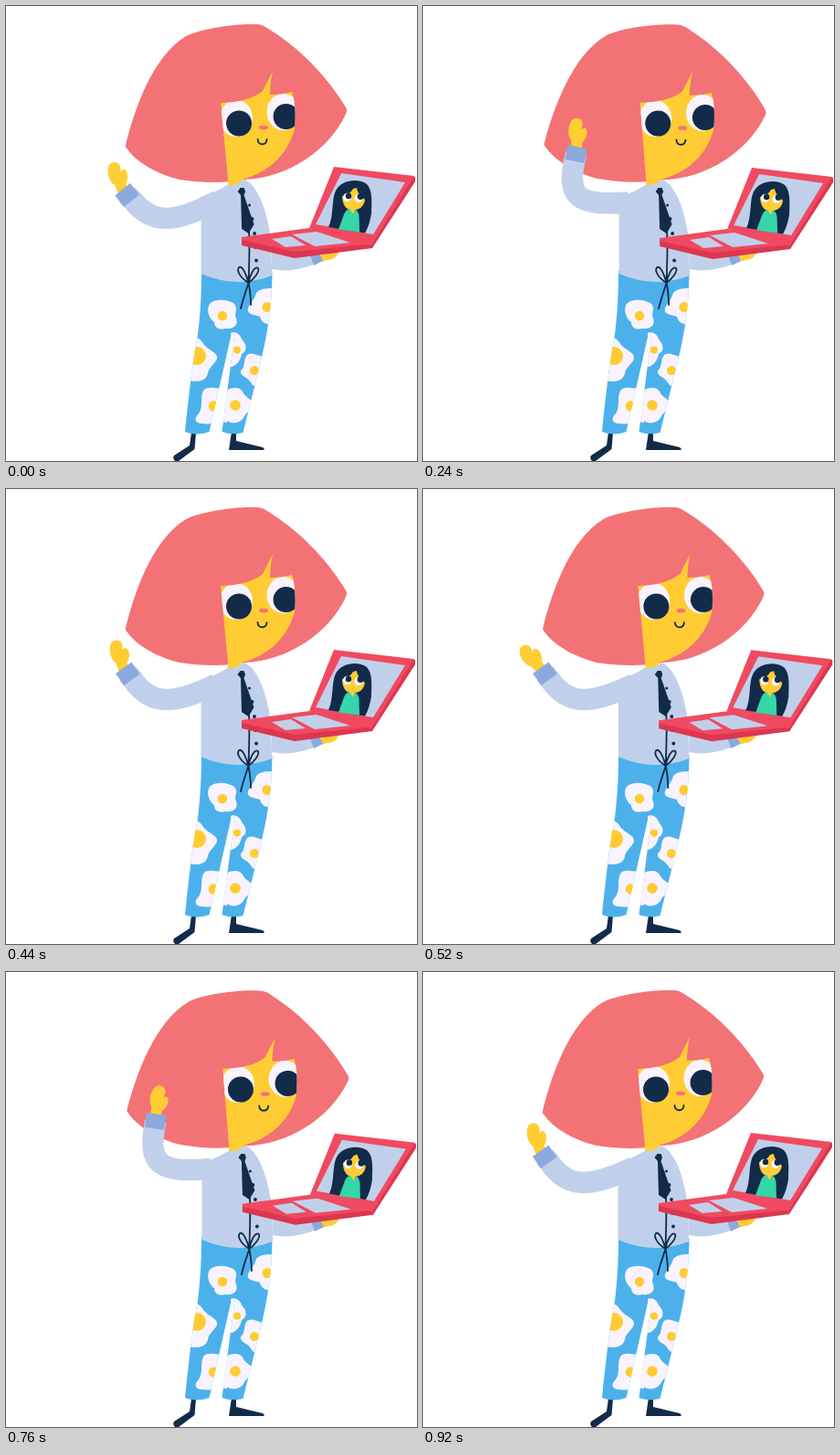
Recreate the animation shown at these times as an HTML page. Size 450 by 498 pixels, loop 960 ms.

```html
<!DOCTYPE html>
<html lang="en">
<head>
<meta charset="utf-8">
<title>Waving with a laptop</title>
<style>
  html, body { margin: 0; width: 100%; height: 100%; overflow: hidden; background: #fff; }
  svg { display: block; width: 100vw; height: 100vh; }
  .skin { fill: #ffcd33; }
  .hair { fill: #f37275; }
  .ink { fill: #122b49; }
  .line { fill: none; stroke: #122b49; stroke-width: 1.8; stroke-linecap: round; stroke-linejoin: round; }
  .shirt { fill: #c1d0ea; }
  .cuff { fill: #8ca9de; }
  .jeans { fill: #4cb1eb; }
  .pale { fill: #f8f3fe; }
  .yolk { fill: #ffcb30; }
  .case { fill: #f04a60; }
  .side { fill: #dc3650; }
  #arm { fill: none; stroke: #c1d0ea; stroke-width: 23.5; stroke-linejoin: round; }
</style>
</head>
<body>
<svg viewBox="0 0 450 498">
  <defs>
    <path id="faceShape" d="M235 106C252 106 270 102 281 93L292 71C290 80 289 88 289 97C298 97 306 96 313 94C317 106 317 122 316 134C310 158 292 181 258 190L258 198H243L243 190Z"/>
    <path id="legs" d="M214 290L291.500 292C291 335 285 365 277 397L259.500 467Q247 470 236.500 466L250 362Q249 355 247 358L222.500 466Q208 471 196 466C203 400 206 380 210 360C213 335 214 315 214 290Z"/>
    <clipPath id="faceClip"><use href="#faceShape"/></clipPath>
    <clipPath id="legClip"><use href="#legs"/></clipPath>
  </defs>

  <path class="ink" d="M203 467H208L206.500 485L189 498H185Q182 495 184 492L201 481Z"/>
  <path class="ink" d="M247 466H252V476L281 483Q284 485 282 486H244Z"/>
  <use href="#legs" class="jeans"/>
  <g clip-path="url(#legClip)">
    <g class="pale">
      <path d="M223 326C229 319 245 322 250 326C255 332 249 336 252 342C255 350 248 354 240 353C233 355 228 352 228 346C222 342 219 332 223 326Z"/>
      <path d="M274 314C280 308 288 309 295 309V349C285 349 280 347 278 340C272 338 263 338 265 331C267 325 272 322 274 314Z"/>
      <path d="M198 363C209 360 213 365 217 371C222 377 232 379 231 386C229 392 222 395 221 402C219 411 210 412 197 410Z"/>
      <path d="M246 358C254 355 257 362 259 366C264 371 264 378 258 381C257 388 252 394 246 395Z"/>
      <path d="M265 381C272 379 275 383 283 384V414C278 418 271 418 268 412C264 405 256 406 257 399C263 395 259 386 265 381Z"/>
      <path d="M218 419C226 416 231 420 242 418V456C230 454 224 459 216 457C206 457 206 451 211 446C217 438 211 425 218 419Z"/>
      <path d="M244 419C252 417 258 418 260 424C264 430 272 431 271 438C270 443 264 443 261 449C257 457 248 458 242 454C236 452 235 446 237 440C236 430 238 423 244 419Z"/>
    </g>
    <g class="yolk">
      <circle cx="237" cy="339" r="5.2"/>
      <circle cx="286" cy="329.500" r="5.5"/>
      <circle cx="209" cy="383" r="10"/>
      <circle cx="253" cy="376.500" r="4"/>
      <circle cx="272" cy="399" r="5"/>
      <circle cx="227.500" cy="438" r="5.8"/>
      <circle cx="251" cy="437" r="5.8"/>
    </g>
  </g>

  <g id="torso">
    <g id="head">
      <path class="hair" d="M131 152C140 115 160 55 197 33C212 25 250 19 274 20C282 20 287 25 292 28C325 49 355 82 372 111Q374 114 372 118C354 158 308 188 262 190C240 194 215 194 190 190C165 184 143 171 133 157Q130 154 131 152Z"/>
      <use href="#faceShape" class="skin"/>
      <g clip-path="url(#faceClip)">
        <ellipse class="pale" cx="252" cy="123" rx="18" ry="20"/>
        <ellipse class="pale" cx="303.500" cy="116" rx="18" ry="20"/>
        <circle class="ink" cx="255" cy="128.500" r="14"/>
        <circle class="ink" cx="306.500" cy="121" r="14"/>
      </g>
      <ellipse class="hair" cx="282" cy="133" rx="5" ry="2.3"/>
      <path class="line" d="M275.500 146C276 153 285 153 285.500 146"/>
    </g>

    <path class="skin" d="M343 274C350 270 358 268 364 268C365 273 358 278 352 278L345 280Z"/>
    <path class="shirt" d="M242 196Q252 197 261 190C270 194 276 204 281 217C286 231 288 243 290 254L291 288C305 291 320 289 337 283L335 262L291 262V295Q253 310 213.500 293V209Q230 204 242 196Z"/>
    <path class="cuff" d="M332 270L342 268L347 279L337 284Z"/>

    <path id="arm"/>
    <path id="hand" class="skin" d="M-6 4L-7 -8C-12 -14 -11 -26 -6 -31C-2 -34 4 -32 5 -27C5 -24 4 -22 4 -20C6 -23 10 -22 10 -17C10 -11 7 -8 5 -5L6 4Z"/>
    <rect id="wrist" class="cuff" x="-10.700" y="-8" width="21.400" height="16"/>

    <path class="ink" d="M253.500 203L256.500 199H260.500L262 203L260.500 207L271.500 239L265.500 249L258 244L257 207Z"/>
    <g class="ink">
      <circle cx="266.500" cy="218" r="1.500"/>
      <circle cx="269.500" cy="233" r="1.900"/>
      <circle cx="272" cy="249" r="1.900"/>
      <circle cx="273" cy="264" r="1.900"/>
      <circle cx="274" cy="278.500" r="1.900"/>
    </g>
    <path class="line" d="M266 246C267 266 266 285 265.500 303C262 314 259 322 257 331M265.500 303C267 311 268 319 268 327M265.500 303C257 298 252 290 255 286C259 284 263 294 265.500 303C267 294 272 284 276 287C278 291 271 299 265.500 303"/>

    <g id="laptop">
      <path class="side" d="M258 253L316 266L403 256L401 265L316 276L258 262Z"/>
      <path class="case" d="M258 253L332 243L404 257L403 260L316 269L258 256Z"/>
      <path class="side" d="M441 186L448 187V192L401 265L396 260Z"/>
      <path class="case" d="M359 176L447 186L400 262L332 243Z"/>
      <path class="shirt" d="M367 183L437 193L402 250L339 239Z"/>
      <path class="shirt" d="M291 255L312 252L328 262L306 264Z"/>
      <path class="shirt" d="M313 250L340 247L377 259L338 263Z"/>
      <path class="ink" d="M353 242C359 230 356 212 361 202C367 190 386 188 395 195C402 202 400 217 400 227Q398 240 393 248.500Z"/>
      <path class="skin" d="M368 208Q376 207 380 200L384 199C384 204 389 208 393 212C392 219 387 223 382 223L380 229L376 223C370 221 368 214 368 208Z"/>
      <path fill="#35d6a8" d="M364 244.500L370 228Q372 223 376 222L380 228L382 222Q386 225 386.500 230L387 247.500Z"/>
      <ellipse class="pale" cx="373.500" cy="209.500" rx="4.500" ry="4.800"/>
      <ellipse class="pale" cx="386" cy="210.500" rx="4.500" ry="4.800"/>
      <circle class="ink" cx="375" cy="208" r="3.200"/>
      <circle class="ink" cx="388" cy="208.500" r="3.400"/>
    </g>
  </g>
</svg>
<script>
  const STEP = 40, WAVE = 480;
  const $ = id => document.getElementById(id);
  const move = (id, value) => $(id).setAttribute('transform', value);

  // Arm low, halfway and high: cuff centre, then the four curve points.
  const low  = [132.5, 207, 138, 212, 160, 240, 185, 238, 232, 213];
  const mid  = [143.5, 178, 146, 188, 151, 221, 172, 229, 225, 216];
  const high = [166.5, 162, 164, 173, 157, 210, 170, 219, 224, 215];

  // Hand tilt over one wave: [ms, degrees]
  const tilts = [[0, -18], [40, -38], [80, -42], [120, -40], [160, -31], [200, -16],
                 [240, 2], [280, 11], [320, 9], [360, 1], [440, -15], [480, -18]];

  const swing = (ms, peak) => (1 + Math.cos(2 * Math.PI * (ms - peak) / WAVE)) / 2;

  function tiltAt(ms) {
    const i = tilts.findIndex(k => k[0] > ms);
    const [t0, a] = tilts[i - 1], [t1, b] = tilts[i];
    return a + (b - a) * (ms - t0) / (t1 - t0);
  }

  function draw(now) {
    const ms = Math.floor(now / STEP) * STEP % WAVE;
    const t = swing(ms, 240), sway = swing(ms, 200);

    const [cx, cy, ...p] = low.map((v, i) =>
      v * (1 - t) * (1 - 2 * t) + mid[i] * 4 * t * (1 - t) + high[i] * t * (2 * t - 1));
    const angle = -39 + 50 * t, rad = angle * Math.PI / 180;

    $('arm').setAttribute('d', `M${cx} ${cy}L${p[0]} ${p[1]}C${p.slice(2).join(' ')}`);
    move('wrist', `translate(${cx} ${cy}) rotate(${angle})`);
    move('hand', `translate(${cx + 7 * Math.sin(rad)} ${cy - 7 * Math.cos(rad)}) rotate(${tiltAt(ms)})`);
    move('head', `rotate(${swing(ms, 230)} 250 195)`);
    move('torso', `translate(${1.2 * sway} 0)`);
    move('laptop', `translate(0 ${sway})`);
  }

  function tick() {
    draw(performance.now());
    requestAnimationFrame(tick);
  }
  tick();
</script>
</body>
</html>
```
